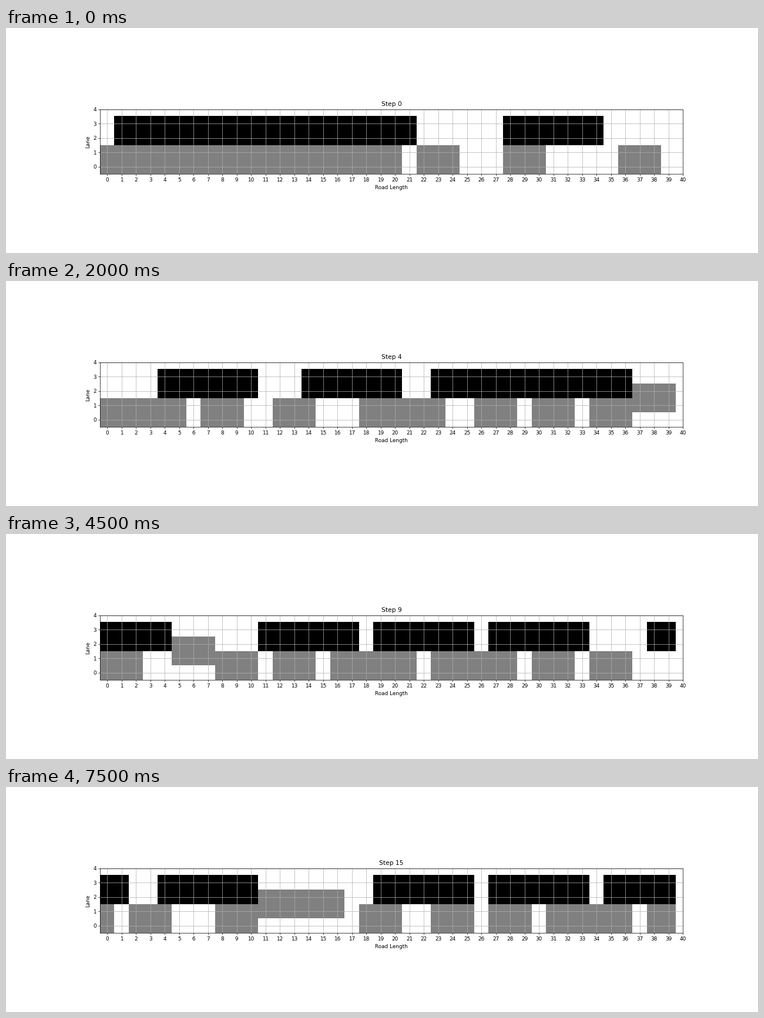
These frames come from a looping animation (1280 by 384 pixels, 8 s). A matplotlib script:

```python
import numpy as np
import matplotlib.pyplot as plt
from matplotlib.animation import FuncAnimation

ROAD, LANES, STEPS = 40, 4, 16
TRUCK, CAR = 7, 3                      # lengths in cells
BLACK, GRAY, WHITE = 0.0, 0.5, 1.0

# (rear cell, steps of waiting in the queue), from the back of the road
TRUCKS = [(1, 2), (8, 1), (15, 0), (28, 0)]
CARS = [(0, 5), (3, 4), (6, 3), (9, 2), (12, 1),
        (15, 1), (18, 0), (22, 0), (28, 0), (36, 0)]
LANE_CHANGE = {9: 1, 0: 11}            # car: step at which it moves up a lane

# Cells covered since setting off: pull away, crawl, speed up again
TIMES = [0, 1, 2, 4, 5, 8, 11, 13, 15]
CELLS = [0, 1, 3, 8, 9, 11, 15, 18, 20]


def travel(start, delay, step):
    return start + int(np.interp(step - delay, TIMES, CELLS) + 0.5)


def drive(queue, length, step, leader):
    """Rear cells of a queue in which nobody runs into the one ahead."""
    rears = []
    for start, delay in reversed(queue):
        leader = min(travel(start, delay, step), leader - length)
        rears.insert(0, leader)
    return rears


def place(road, rear, length, lane, shade):
    cells = np.arange(rear, rear + length) % ROAD
    road[lane:lane + 2, cells] = shade


def road_at(step):
    road = np.full((LANES, ROAD), WHITE)
    # The first car meets the last one around the ring.
    cars = drive(CARS, CAR, step, travel(*CARS[0], step) + ROAD)
    trucks = drive(TRUCKS, TRUCK, step, cars[-1])
    for rear in trucks:
        place(road, rear, TRUCK, 2, BLACK)
    for i, rear in enumerate(cars):
        lane = int(step >= LANE_CHANGE.get(i, STEPS))
        place(road, rear, CAR, lane, GRAY)
    return road


plt.rcParams["font.family"] = "DejaVu Sans"
fig, ax = plt.subplots(figsize=(20, 6), dpi=64)
# The top edge reaches up to the next whole pixel.
image = ax.imshow(road_at(0), cmap="gray", vmin=0, vmax=1, origin="lower",
                  interpolation="nearest", extent=(-0.5, 39.5, -0.5, 3.52))
ax.set_aspect("equal")
ax.set_xticks(range(ROAD + 1))
ax.set_yticks(range(LANES + 1))
ax.set_xlim(-0.5, ROAD)
ax.set_ylim(-0.5, LANES)
ax.set_xlabel("Road Length")
ax.set_ylabel("Lane")
ax.grid(True)
title = ax.set_title("Step 0")


def update(step):
    image.set_data(road_at(step))
    title.set_text(f"Step {step}")
    return image, title


anim = FuncAnimation(fig, update, frames=STEPS, interval=500,
                     repeat=True, repeat_delay=0)
plt.show()
```
